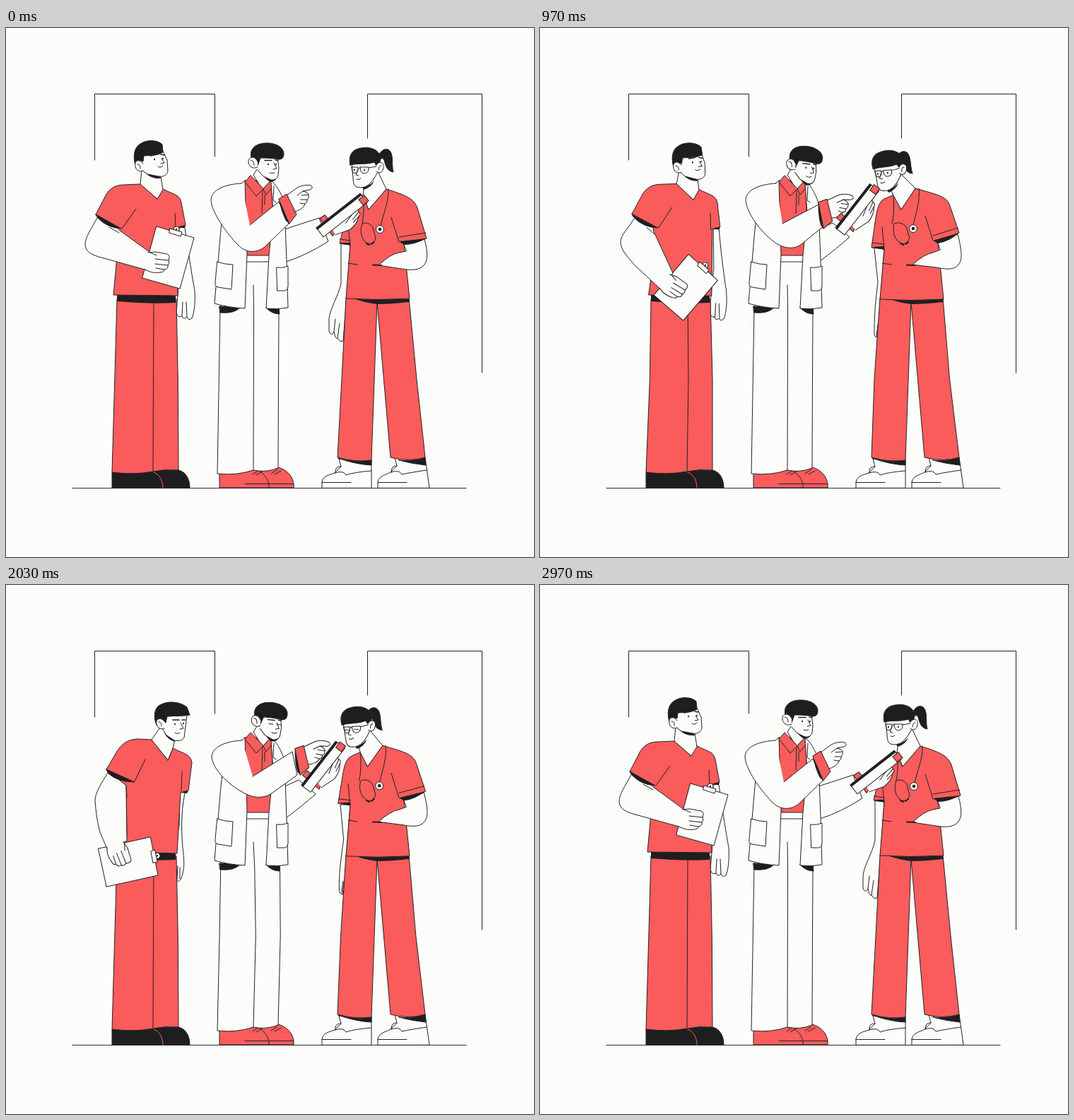
An HTML page with a canvas for the animation above (3000 ms loop, 747x749 px).

```html
<!DOCTYPE html>
<html lang="en">
<head>
<meta charset="utf-8">
<title>Medical team</title>
<style>
html, body { margin: 0; width: 100%; height: 100%; overflow: hidden; background: #fcfcfa; }
canvas { display: block; width: 747px; height: 749px; }
</style>
</head>
<body>
<canvas id="stage" width="747" height="749"></canvas>
<script>
const ctx = document.getElementById('stage').getContext('2d');
const LOOP = 3000, INK = '#222226', WHITE = '#fcfcfa', RED = '#f95c5b', BLACK = '#1e1e20';
const NUM = /-?\d+(\.\d+)?/g;

// Smooth curve through keys without overshoot
function curve(times, vals, t) {
  let i = 0;
  while (i < times.length - 2 && t >= times[i + 1]) i++;
  const slope = j => (vals[j + 1] - vals[j]) / (times[j + 1] - times[j]);
  const tangent = j => {
    if (j < 1 || j >= times.length - 1) return 0;
    const a = slope(j - 1), b = slope(j);
    return a * b > 0 ? 2 * a * b / (a + b) : 0;
  };
  const h = times[i + 1] - times[i], s = (t - times[i]) / h, r = 1 - s;
  return vals[i] * (1 + 2 * s) * r * r + tangent(i) * h * s * r * r
    + vals[i + 1] * s * s * (3 - 2 * s) - tangent(i + 1) * h * s * s * r;
}

const numbers = p => p.match(NUM).map(Number);

// Path between several poses; order names the pose at each key
function morph(poses, times, order, t) {
  const n = poses.map(numbers);
  let k = 0;
  return poses[0].replace(NUM, () => {
    const v = curve(times, order.map(o => n[o][k]), t);
    k++;
    return v.toFixed(2);
  });
}

function blend(a, b, w) {
  const n = numbers(b);
  let k = 0;
  return a.replace(NUM, v => (+v + (n[k++] - v) * w).toFixed(2));
}

function draw(path, fill, stroke = INK, width = 1) {
  const p = new Path2D(path);
  if (fill) { ctx.fillStyle = fill; ctx.fill(p); }
  if (stroke) { ctx.strokeStyle = stroke; ctx.lineWidth = width; ctx.stroke(p); }
}
const line = (path, width) => draw(path, null, INK, width);

function oval(x, y, rx, ry, fill, stroke = INK) {
  ctx.beginPath();
  ctx.ellipse(x, y, rx, ry, 0, 0, 7);
  if (fill) { ctx.fillStyle = fill; ctx.fill(); }
  if (stroke) { ctx.strokeStyle = stroke; ctx.lineWidth = 1; ctx.stroke(); }
}

// Move the point (px, py) to (x, y) and turn around it
function group(x, y, deg, px, py, body) {
  ctx.save();
  ctx.translate(x, y);
  ctx.rotate(deg * Math.PI / 180);
  ctx.translate(-px, -py);
  body();
  ctx.restore();
}

function eyes(list, shut) {
  for (const [x, y] of list) {
    if (shut) line(`M${x - 3},${y} L${x + 3},${y + 0.5}`);
    else oval(x, y, 1, 1.3, BLACK, null);
  }
}

const blinking = t => Math.abs(t - 430) < 75 || Math.abs(t - 2030) < 75;

function room() {
  line('M125.5,187 V93.5 H295.5 V182 M511.5,156 V93.5 H673.5 V488');
  draw('M94,651.5 H651', null, '#2a2a48');
}

// ---- Nurse with the clipboard, left ----
const nurseT = [0, 560, 970, 1330, 1620, 2120, 2530, 2900, 3000];
const nurseArm = [
  'M130,267 C120,285 112,297 112,306 C112,318 124,322 135,325 L200,343 L204,318 L160,286',
  'M133,270 C124,285 114,293 114,303 C114,313 122,322 134,336 L172,371 L188,347 L160,286',
  'M138,268 C130,280 118,294 119,304 C120,316 126,334 131,345 L146,374 L171,363 L165,288',
  'M144,266 C135,280 126,295 126,305 C127,320 129,336 133,350 L144,376 L171,362 L170,288',
  'M136,268 C128,282 117,293 117,302 C118,312 128,322 140,334 L180,366 L197,343 L162,287'
];

function nurse(t) {
  const key = (...v) => curve(nurseT, v, t);
  const u = key(0, 0, .2, .75, 1, 1, .5, 0, 0);
  const dy = key(0, 0, 2, 3.5, 0, 0, 3.5, 0, 0);
  const k = key(0, 0, 1.5, 4, 0, 0, 4, 0, 0);
  const turn = key(0, 0, 25, 62, 62, 62, 25, 0, 0);
  const wx = key(202, 202, 179, 156, 155, 155, 187.5, 202, 202);
  const wy = key(331, 331, 361, 369.5, 370.5, 370.5, 356, 331, 331);
  const part = (a, b, fill, stroke, width) => draw(blend(a, b, u), fill, stroke, width);

  part('M253,283 C257,310 262,345 267,372 C268,392 266,404 263,411 Q258,415 256,409 Q251,414 249,408 Q243,411 241,403 L243,378 L246,340 L245,283 Z',
    'M254,291 C249,310 247,340 250,372 C253,395 252,404 248,415 Q245,421 242,419 Q238,420 238,412 Q236,410 236,400 L238,378 L245,340 L246,291 Z', WHITE);
  part('M249,408 L250,388 M256,409 L255,388', 'M242,417 L243,398 M246,416 L246,400');

  draw('M150,629 V651 H260 C260,638 254,628 244,626 Z', BLACK);
  draw(`M157,384 L${153.8 + k},498 L150,629 Q180,633 208,628 Q226,624 244,626 L${243.3 + k * .5},498 L241,384 Z`, RED);
  line(`M209,388 L${208.5 + k},498 L208,628`);
  draw('M209,629 C218,632 222,642 222,651', null, RED);
  draw('M157,377 H240 V389 Q200,391 157,387 Z', BLACK, null);

  part('M191,221 L167,222 C150,222 143,232 139,241 L127,264 L158,283 L156,335 L152,378 L243,379 L243,283 L254,279 L248,247 C246,236 238,236 222,228 L214,242 Z',
    'M206,219 L188,218 C168,218 160,230 155,239 L142,261 L170,284 L171,355 L160,378 L242,380 L247,294 L258,291 L263,252 C262,240 252,239 236,231 L229,248 Z', RED);
  part('M164,284 L184,256 M240,284 L239,262', 'M182,278 L197,247 M248,292 L249,264');
  part('M241,282 L254,279 L253,283 Z', 'M247,294 L258,291 L256,295 Z', BLACK, null);
  part('M192,200 L190,221 L214,242 L222,229 L219,210', 'M217,203 L206,219 L229,248 L236,231 L239,218', WHITE);

  ctx.save();
  ctx.translate(0, dy);
  part('M198,206 L218,210 L219,213 Q206,214 198,206 Z', 'M224,210 L240,219 L239,222 Q229,219 224,210 Z', BLACK, null);
  part('M194,181 L221,172 L228,187 L229,202 C228,209 222,211 216,210 L200,207 L193,202',
    'M226,186 L256,184 L254,200 L252,216 C249,221 243,221 238,220 L226,212 L222,204', WHITE);
  part('M183,194 C180,184 180,170 190,164 C200,157 216,159 221,165 L222,176 C214,181 205,180 195,181 L194,189 C188,186 184,190 183,194 Z',
    'M213,198 C209,190 209,176 216,171 C228,163 246,165 256,173 L260,184 C250,186 240,185 228,186 L226,195 C220,190 215,193 213,198 Z', BLACK);
  part('M194,192 C188,184 181,188 183,196 C184,202 189,204 194,202', 'M225,194 C219,186 211,189 213,197 C215,203 219,205 224,203', WHITE);
  part('M186,193 Q191,193 190,199', 'M216,194 Q221,194 220,200');
  part('M204,181 L213,179', 'M236,191 L245,191', null, INK, 1.5);
  part('M219,179 L224,180', 'M249,191 L254,191', null, INK, 1.5);
  part('M220,185 L224,191 L219,192', 'M247,195 L251,203 L246,204');
  part('M215,196 Q218,199 222,195', 'M239,209 Q243,212 246,209');
  eyes([[210 + 29 * u, 186 + 11 * u], [222 + 29 * u, 185 + 11 * u]], false);
  ctx.restore();

  group(wx, wy, turn, 202, 331, () => {
    draw('M213,281 L266,297 L246,369 L193,354 Z', WHITE);
    oval(241, 285, 4, 4, WHITE);
    oval(241, 285, 1.2, 1.2, BLACK, null);
    draw('M232,284 L249,289 L247,295 L231,290 Z', WHITE);
  });
  draw(morph(nurseArm, nurseT, [0, 0, 1, 2, 3, 3, 4, 0, 0], t), WHITE);
  line(blend('M146,282 L160,290', 'M170,284 L171,300', u));
  group(wx, wy, turn, 202, 331, () => {
    draw('M197,342 C205,347 213,347 218,346 Q224,346 224,342 Q230,341 229,336 Q232,333 230,329 Q233,322 228,320 L212,317 L201,318', WHITE);
    line('M230,329 L211,327 M229,336 L211,334 M224,342 L212,340 M204,318 L213,322');
  });
  part('M127,264 L163,284 Q143,283 130,269 Z', 'M142,261 L182,279 Q158,279 145,267 Z', BLACK);
}

// ---- Doctor in the coat, middle ----
const docT = [0, 120, 430, 720, 970, 1330, 1850, 2030, 2450, 3000];
const docOrder = [0, 0, 1, 2, 2, 3, 3, 4, 0, 0];
const docArm = [
  'M333,220 C312,221 291,228 290,243 C291,262 312,290 328,307 C340,320 356,318 366,310 L400,277 L386,246 L345,279',
  'M334,220 C313,221 292,228 291,243 C292,262 312,290 326,306 C340,321 358,320 367,313 L403,281 L390,250 L340,278',
  'M334,220 C313,221 292,228 291,243 C292,262 312,288 330,302 C344,313 360,314 370,306 L402,280 L394,250 L343,277',
  'M334,220 C313,221 292,228 291,243 C292,262 312,288 330,302 C344,313 360,314 372,306 L409,275 L401,244 L345,277',
  'M334,220 C313,221 292,228 291,243 C292,260 314,282 334,293 C350,303 366,302 376,295 L412,269 L405,236 L349,271'
];
const boardT = [0, 100, 430, 720, 1330, 2030, 2530, 2850, 3000];
const holdArm = [
  'M388,287 L443,269 L456,302 Q425,322 396,331',
  'M388,290 L425,272 L443,299 Q420,316 396,331',
  'M388,288 L414,276 L438,296 Q420,312 396,330',
  'M388,287 L440,270 L454,304 Q425,323 396,331'
];

function doctor(t) {
  const key = (...v) => curve(docT, v, t);
  const w = key(0, 0, 1, 1, 1, 1, 1, .75, 0, 0);
  const k = key(0, 0, 4, 0, 0, 0, 0, 3, 0, 0);
  const boardKey = (...v) => curve(boardT, v, t);

  draw('M302,631 V651 H407 C408,640 402,627 385,622 L350,624 Z', RED);
  draw('M350,624 C362,627 373,638 372,651', null);
  line('M338,645.5 H407 M349,632 L358,626 M354,633 L363,628 M375,631 L384,625 M380,632 L389,627');
  draw(`M340,326 L${303 + k * .25},396 L${301.3 + k * .25},497 L299,631 Q326,634 350,626 Q368,630 385,623 L${385.5 + k * .9},497 L${386 + k * .5},396 L372,326 Z`, WHITE);
  line(`M350,364 L${350.5 + k * .4},398 L${350.3 + k},497 L350,626`);
  draw('M302,394 L331,396 Q322,405 303,403 Z M368,396 L386,396 L387,405 Q376,405 368,396 Z', BLACK);

  draw('M338,216 H377 V323 H338 Z', RED);
  draw('M338,322 H373 V331 H338 Z', WHITE);
  draw(morph(holdArm, boardT, [0, 0, 1, 2, 2, 2, 3, 0, 0], t), WHITE);
  draw('M355,200 L350,208 L363,229 L374,218 L373,213', WHITE);
  draw('M346,209 L338,218 L354,238 L364,228 Z M374,217 L378,224 L368,236 L364,228 Z', RED);
  line('M363,230 L362,262 M366,236 L366,250');
  draw('M333,220 L338,216 L341,320 L338,397 Q315,396 295,390 L304,285 L310,235 Z', WHITE);
  draw('M375,216 C381,220 390,234 394,248 L397,330 L399,396 Q384,399 368,397 L372,322 L378,262 Z', WHITE);
  line('M379,224 L378,244 L382,247');
  draw('M299,331 Q310,335 321,335 L319,370 L300,367 Q295,366 296,360 Z M383,339 Q392,340 399,337 V366 Q398,373 392,372 L384,372 Z', WHITE);

  group(365 + 4 * w, 205 + 4 * w, 6 * w, 365, 205, () => {
    draw('M364,209 L383,213 Q381,217 374,218 Q368,215 364,209 Z', BLACK, null);
    draw('M356,182 L384,182 L386,198 L385,209 Q383,216 375,215 L364,210 L356,201', WHITE);
    draw('M347,184 C344,172 352,164 366,163 C380,162 393,168 393,178 C393,184 390,186 386,186 C374,184 366,184 360,184 L356,195 L352,184 Q348,182 347,184 Z', BLACK);
    draw('M356,189 C351,179 342,183 343,190 C344,197 350,200 356,197', WHITE);
    line('M346,187 Q351,187 351,194');
    line('M366,187.5 L376,187.5 M381,187 L385,187.5', 1.5);
    line('M379,191 L383,199 L378,200 M373,205 Q376,207 380,205');
    eyes([[371, 193], [382, 193]], blinking(t));
  });

  draw(morph(docArm, docT, docOrder, t), WHITE);
  const hx = key(0, 0, 3, 5, 5, 13, 13, 20, 0, 0);
  const hy = key(0, 0, 6, 7, 7, 1, 1, -8, 0, 0);
  group(398 + hx, 254 + hy, key(0, 0, 3, 12, 12, 12, 12, 12, 0, 0), 398, 254, () => {
    draw('M396,238 L412,226 Q422,221 431,223 Q436,226 430,229 L420,231 Q429,233 428,237 Q429,241 426,243 Q427,247 423,249 Q421,257 406,261', WHITE);
    line('M420,231 L412,237 M428,236 L418,237 M426,243 L417,243 M423,249 L416,248');
    draw('M386,242 L397,235 L411,264 L401,277 Z', RED);
    draw('M386,242 L401,277 L396,273 Q389,260 386,242 Z', BLACK, null);
  });

  const bx = boardKey(470.5, 470.5, 450.5, 443.5, 443, 443, 465, 470.5, 470.5);
  const by = boardKey(260, 260, 259.5, 252.5, 254, 253.5, 259, 260, 260);
  group(bx, by, boardKey(-38, -38, -52, -52, -52, -52, -45, -38, -38), 0, 0, () => {
    draw('M-27,-9 L-18,-8 L-18,19 L-28,22 Z', RED);
    draw('M-22,14 L18,12 Q26,14 22,18 Q24,22 18,23 Q10,30 -3,30 L-24,23', WHITE);
    draw('M-39,0 H40 V15 H-39 Z', WHITE);
    draw('M-39,-1.500 H40 V1.500 H-39 Z', BLACK);
    draw('M33,4 H43 V14 H33 Z', RED);
    line('M-2,19 L12,15 M22,18 L9,21 M18,23 L7,25');
  });
}

// ---- Colleague with the stethoscope, right ----
function colleague(t) {
  const w = curve([0, 100, 430, 680, 1850, 2030, 2400, 3000], [0, 0, .7, 1, 1, .75, 0, 0], t);
  const drop = curve([0, 100, 430, 720, 1900, 2030, 2450, 3000], [0, 0, .45, 1, 1, .9, 0, 0], t);
  const part = (a, b, fill, stroke, width) => draw(blend(a, b, w), fill, stroke, width);

  draw(blend('M474,306 L474,362 C470,380 458,398 457,412 L457,430 Q461,437 464,430 Q466,441 469,439 Q473,446 477,443 L482,380 L487,307 Z',
    'M473,312 L478,360 C475,385 473,405 473,425 L473,434 Q474,438 475,437 Q476,439 477,438 Q478,439 479,438 L482,380 L487,312 Z', drop), WHITE);
  line(blend('M464,430 L466,412 M469,439 L472,418', 'M476,436 L478,420 M477,437 L479,420', drop));

  draw('M447,651 V643 C449,633 458,633 465,630 L474,621 L471,610 H517 V651 Z', WHITE);
  draw('M526,651 V643 C528,633 538,633 544,629 L553,620 L550,608 H593 L599,651 Z', WHITE);
  line('M447,643.5 H488 M526,643.5 H567 M466,630 Q465,620 474,621 M545,629 Q545,619 553,620');
  line('M465,630 Q478,626 481,633 Q492,629 517,627 M544,629 Q557,625 560,632 Q574,629 595,626');
  draw('M470,609 Q495,616 517,612 V619 Q495,618 470,609 Z M556,612 Q574,614 593,608 L594,619 Q574,617 556,612 Z', BLACK);
  draw(`M481,382 L${475 - 2 * w},497 L469,608 Q493,615 517,612 L525,388 L544,608 Q570,615 593,608 L${581 - 1.5 * w},497 L570,382 Z`, RED);
  draw('M495,384 H570 V388 Q545,391 525,391 Q508,389 495,384 Z', BLACK, null);

  part('M506,237 L490,245 C484,252 482,262 480,272 L472,305 L487,307 L481,383 Q525,386 571,383 L563,306 L595,298 L583,258 C579,243 570,238 538,228 L513,257 Z',
    'M501,236 L487,242 C478,246 476,262 474,275 L469,311 L487,313 L481,384 Q525,387 571,384 L563,304 L593,290 L580,252 C576,238 562,236 531,227 L511,257 Z', RED);
  part('M472,299 L487,301 M487,307 L484,280 M556,303 L545,268 M556,296 L594,290', 'M470,304 L487,306 M487,313 L484,282 M556,301 L545,266 M556,294 L591,283');
  part('M473,304 L487,304 L487,308 Z', 'M470,310 L487,309 L487,314 Z', BLACK, null);
  part('M526,203 L538,228 L513,257 L505,237 L507,223', 'M512,208 L531,227 L511,257 L500,237 L495,226', WHITE);

  part('M563,306 L592,299 C597,318 597,328 592,335 C585,344 572,343 560,341 L527,336 Q544,320 556,318 L566,316 Z',
    'M563,304 L591,292 C597,316 598,328 592,335 C585,344 572,341 560,339 L527,335 Q544,320 556,318 L566,314 Z', WHITE);
  part('M556,302 L595,298 Q578,307 563,307 Z', 'M556,301 L593,290 Q578,303 563,305 Z', BLACK, null);
  line('M484,333 L497,335');
  line('M519,335.5 L531,336', 2);

  part('M506,240 Q507,262 504,277 M541,228 C542,245 534,262 530,280', 'M500,238 Q502,262 498,277 M536,227 C538,245 532,262 528,279');
  part('M504,277 Q512,273 519,282 L523,298 Q519,308 511,305 Q502,299 502,286 Z', 'M501,277 Q510,273 518,281 L523,297 Q519,308 511,305 Q500,299 500,286 Z', RED);
  line('M510,305 L514,307 M517,306 L521,303', 2);
  oval(529 - w, 285 - w, 5.5, 5.5, WHITE);
  oval(529 - w, 285 - w, 2.3, 2.3, BLACK, null);

  group(508 - 14 * w, 215 + 4 * w, -5 * w, 508, 215, () => {
    const tail = 'M526,184 C529,174 536,169 542,173 C549,179 545,192 548,204 C541,203 538,198 536,191 C535,185 532,182 529,187 Z';
    group(-6 * w, w, 0, 0, 0, () => draw(tail, BLACK));
    draw('M504,226 Q514,224 521,216 Q517,226 506,229 Z', BLACK, null);
    draw('M489,190 L491,212 Q491,223 496,225 Q504,228 513,222 Q521,215 526,204 L526,188 Z', WHITE);
    draw('M487,194 C484,181 489,172 502,170 C517,167 530,174 530,185 L528,194 L524,195 L521,190 C508,194 498,191 487,194 Z', BLACK);
    draw('M524,194 C529,187 536,191 534,198 C533,205 527,207 524,203', WHITE);
    line('M531,195 Q527,195 527,201');
    draw('M489,197 H498 V202 Q496,207 491,205 Z M501,197 H513 Q514,206 506,206 Q501,205 501,197 Z', null);
    line('M498,199 Q499.500,197 501,199 M513,198 L524,196 M498,200 L495,208 L499,209 M496,214 Q499,216 502,213');
    eyes([[493, 201], [507, 201]], blinking(t));
  });
}

function frame(now) {
  const t = now % LOOP;
  ctx.fillStyle = WHITE;
  ctx.fillRect(0, 0, 747, 749);
  ctx.lineJoin = ctx.lineCap = 'round';
  room();
  nurse(t);
  colleague(t);
  doctor(t);
}

const start = performance.now();
function tick() {
  frame(performance.now() - start);
  requestAnimationFrame(tick);
}
tick();
</script>
</body>
</html>
```
